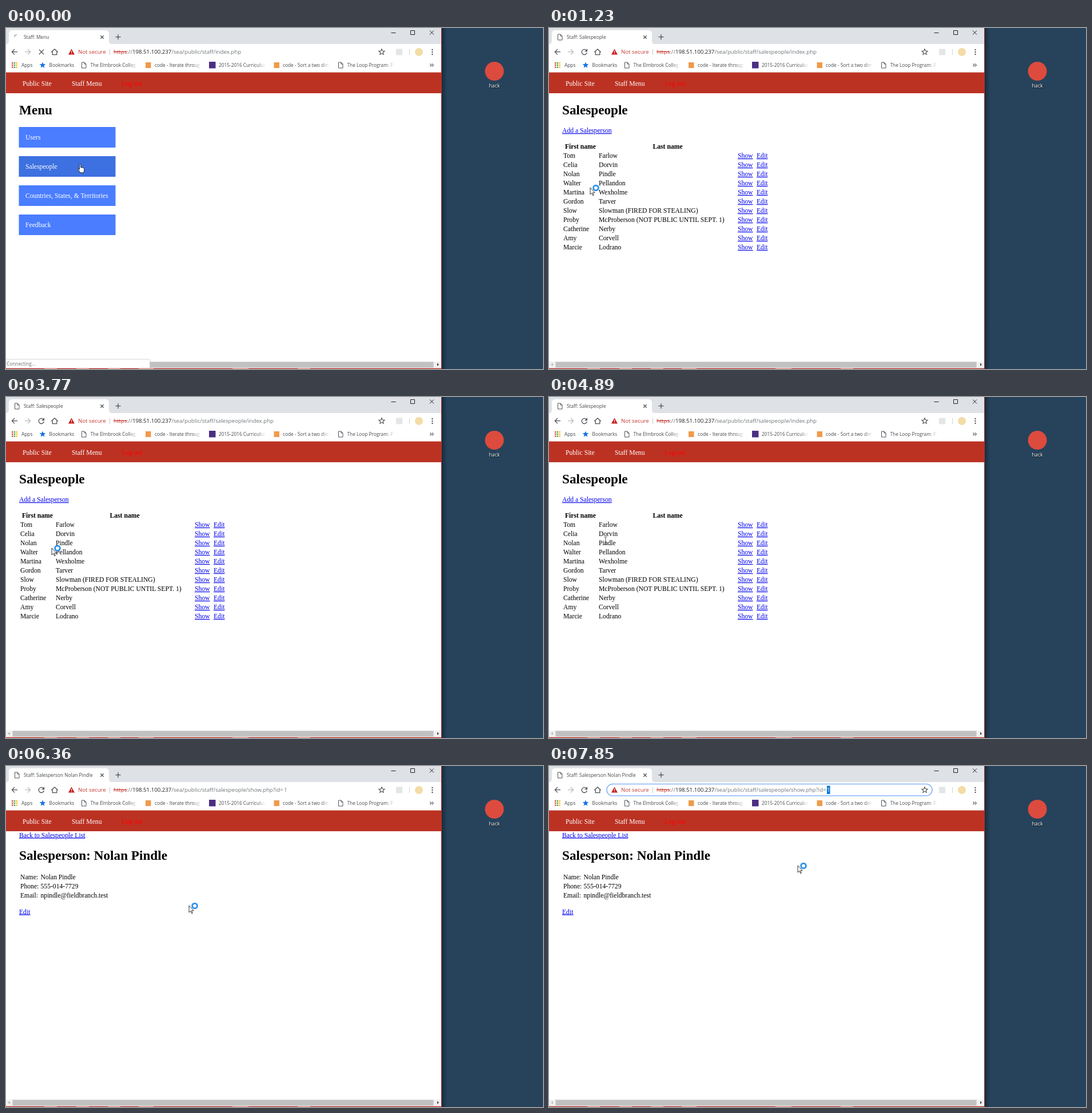
Recreate the animation shown at these times as an HTML page. Size 939 px wide and 596 px high, loop 8000 ms.

```html
<!DOCTYPE html>
<html lang="en">
<head>
<meta charset="utf-8">
<title>Staff area</title>
<style>
html, body { margin: 0; width: 100%; height: 100%; overflow: hidden; background: #fff; }
svg { display: block; width: 939px; height: 596px; }
text { white-space: pre; }
.ui { font: 8.3px "Open Sans", "Noto Sans", sans-serif; fill: #45494d; }
.url { font: 9.67px "Open Sans", "Noto Sans", sans-serif; fill: #70757a; }
.page { font: 11.65px "Liberation Serif", "Times New Roman", serif; fill: #000; }
.bold { font-weight: bold; }
.head { font-weight: bold; font-size: 23.2px; }
.link { fill: #00e; text-decoration: underline; }
.white { fill: #fff; }
.desk { font-size: 8.8px; text-shadow: 1px 1px 1px #000; }
.icon { fill: none; stroke: #4d5156; stroke-width: 1.3; }
</style>
</head>
<body>
<svg id="stage" viewBox="0 0 939 596" xmlns="http://www.w3.org/2000/svg"></svg>
<script>
const LOOP = 8000;
const person = "Nolan Pindle";

const rect = (x, y, w, h, fill, more = "") =>
  `<rect x="${x}" y="${y}" width="${w}" height="${h}" fill="${fill}" ${more}/>`;
const text = (cls, x, y, s, more = "") =>
  `<text class="${cls}" x="${x}" y="${y}" ${more}>${s}</text>`;
const page = (x, y, s, cls = "") => text("page " + cls, x, y, s);
const icon = (d, more = "") => `<path class="icon" d="${d}" ${more}/>`;
const group = (id, body) => `<g id="${id}">${body}</g>`;
const docIcon = (x, y) =>
  icon(`M${x} ${y}h4.5l3 3v7h-7.5zM${x + 4.5} ${y}v3h3`, 'style="stroke-width:1"');

function star(cx, cy, r, more) {
  let d = "";
  for (let i = 0; i < 10; i++) {
    const a = Math.PI * (i / 5 - 0.5), q = i % 2 ? r * 0.45 : r;
    d += `${i ? "L" : "M"}${(cx + q * Math.cos(a)).toFixed(2)} ${(cy + q * Math.sin(a)).toFixed(2)}`;
  }
  return `<path d="${d}Z" ${more}/>`;
}

// Bookmark label that fades out at its right end
const bookmark = (x, end, s) =>
  text("ui", x, 68, s, 'clip-path="url(#cut' + end + ')"') +
  `<clipPath id="cut${end}"><rect x="${x}" y="56" width="${end - x}" height="18"/></clipPath>` +
  rect(end - 14, 57, 15, 16, "url(#fade)");

function browser() {
  let s = rect(0, 0, 762, 596, "#fff") + rect(0, 0, 762, 28, "#dee1e6");
  s += '<path d="M0 28Q5 28 5 22V10Q5 4 11 4H174Q180 4 180 10V22Q180 28 185 28Z" fill="#fff"/>';
  s += icon("M165.3 13.3l5.4 5.4m0-5.4l-5.4 5.4M191.5 15.7h9M196 11.2v9");
  s += icon("M673.5 8.5h8M707.5 4.5h7v7h-7zM741 4.5l7 7m0-7l-7 7", 'style="stroke:#222;stroke-width:1"');
  s += icon("M20 41.7H10.5M15 37L10.4 41.7l4.6 4.7");
  s += icon("M33 41.7h9.5M38 37l4.6 4.7-4.6 4.7", 'style="stroke:#b9bcc0"');
  s += icon("M79.3 42.3L85 37l5.7 5.3M81.2 41.5v5.2h7.6v-5.2");
  s += group("reload", icon("M65.8 39.6A4.6 4.6 0 1 0 66.4 43M66.4 36.8v3.7h-3.7"));
  s += group("stop", icon("M57.8 37.6l8.4 8.4m0-8.4l-8.4 8.4"));
  s += rect(101, 31.5, 569, 21, "#f1f3f4", 'id="hover" rx="10.5"');
  s += rect(101, 31.5, 569, 20.5, "#fff", 'id="focus" rx="10.2" stroke="#8ab4f8" stroke-width="1.6"');
  s += '<path d="M114.5 36.5L120 46.5H109Z" fill="#c5221f"/>' +
    rect(114, 39.8, 1.1, 3.2, "#fff") + rect(114, 44, 1.1, 1.1, "#fff");
  s += text("url", 126, 45, "Not secure", 'style="fill:#c5392f"');
  s += rect(181, 37, 1, 10, "#c4c7ca") + rect(705, 37, 1, 10, "#d0d3d6");
  s += rect(486, 34.5, 5.5, 14.5, "#0078d7", 'id="mark"');
  s += '<text class="url" x="188" y="45"><tspan fill="#c5392f" text-decoration="line-through">https</tspan>' +
    '<tspan>://</tspan><tspan fill="#202124">198.51.100.237</tspan><tspan id="path"></tspan></text>' +
    text("", 486, 45, "1", 'id="digit" font-size="9.67" font-family="Open Sans, Noto Sans, sans-serif"');
  s += star(657, 42, 5.3, 'fill="none" stroke="#4d5156" stroke-width="1.1"');
  s += rect(682, 36.5, 11, 11, "#e4e5e7");
  s += '<circle cx="722" cy="42" r="7" fill="#f3dca6"/>';
  for (const y of [38, 42, 46]) s += `<circle cx="745.5" cy="${y}" r="1.2" fill="#4d5156"/>`;

  const dots = ["#ea4335", "#34a853", "#fbbc04", "#4285f4"];
  for (let i = 0; i < 9; i++)
    s += rect(10 + i % 3 * 3.7, 60 + Math.floor(i / 3) * 3.7, 2.4, 2.4, dots[(i + Math.floor(i / 3)) % 4]);
  s += text("ui", 27, 68, "Apps") + star(64, 65, 5.6, 'fill="#1a73e8"') + text("ui", 75.5, 68, "Bookmarks");
  s += docIcon(132.5, 60) + bookmark(147.5, 228, "The Elmbrook College");
  s += rect(244, 60, 9.5, 10, "#ee9b4c") + bookmark(260, 340, "code - Iterate through");
  s += rect(355, 59, 11.5, 11.5, "#4b2e83") + bookmark(372, 453, "2015-2016 Curriculum");
  s += rect(468.5, 60, 9.5, 10, "#ee9b4c") + bookmark(484, 565, "code - Sort a two dimen");
  s += docIcon(581.5, 60) + bookmark(596.5, 678, "The Loop Program: Pla");
  s += icon("M741.5 62.5l2.4 2.4-2.4 2.4m3.4-4.8l2.4 2.4-2.4 2.4", 'style="stroke-width:1.1"');

  s += group("doc", docIcon(15.5, 11));
  s += icon("M14.8 15.5A4.6 4.6 0 0 1 19 11.6", 'id="spin" style="stroke:#8b9096"');
  s += text("ui", 31, 19, "", 'id="title"');
  return s;
}

const nav = rect(0, 77.6, 762, 36.4, "#bb3223") +
  page(29, 101, "Public Site", "white") + page(115, 101, "Staff Menu", "white") +
  text("page", 202, 101, "Log out", 'style="fill:#f00"');

const menu = page(23, 151, "Menu", "head") +
  ["Users", "Salespeople", "Countries, States, &amp; Territories", "Feedback"].map((s, i) =>
    rect(22.5, 173 + 51 * i, 169, 36, i === 1 ? "#3d70e0" : "#4a7dff") +
    page(34, 195 + 51 * i, s, "white")).join("");

const staff = ["Tom|Farlow", "Celia|Dorvin", person.replace(" ", "|"), "Walter|Pellandon", "Martina|Wexholme",
  "Gordon|Tarver", "Slow|Slowman (FIRED FOR STEALING)", "Proby|McProberson (NOT PUBLIC UNTIL SEPT. 1)",
  "Catherine|Nerby", "Amy|Corvell", "Marcie|Lodrano"];

const list = page(23, 151, "Salespeople", "head") + page(23, 183, "Add a Salesperson", "link") +
  page(28, 211, "First name", "bold") + page(181.5, 211, "Last name", "bold") +
  staff.map((row, i) => {
    const [first, last] = row.split("|"), y = 227 + 16 * i;
    return page(25, y, first) + page(87, y, last) + page(330, y, "Show", "link") + page(363, y, "Edit", "link");
  }).join("");

const details = [["Name:", person], ["Phone:", "555-014-7729"], ["Email:", "npindle@fieldbranch.test"]];
const show = page(23, 124.5, "Back to Salespeople List", "link") +
  page(23, 164, "Salesperson: " + person, "head") +
  details.map(([k, v], i) => page(25, 198 + 16 * i, k) + page(60.5, 198 + 16 * i, v)).join("") +
  page(23, 258.5, "Edit", "link");

// Accent border along the right and bottom edges of the window
const border = rect(761, 0, 1, 596, "#a5302a") + rect(0, 594.7, 762, 1.3, "#b32b21") +
  '<path d="M67 595.5h22M123 595.5h22M178 595.5h22M232 595.5h26M396 595.5h28M510 595.5h22" stroke="#dc9a92"/>';

const footer = rect(0, 583, 761, 11.5, "#f1f1f1") + rect(11.5, 583.5, 736, 10, "#c1c1c1") +
  '<path d="M6.5 585.7v5L3.8 588.2Z" fill="#a3a3a3"/><path d="M754 585.5v5.4L757 588.2Z" fill="#404040"/>' +
  group("bubble", rect(-3, 579, 254.5, 18, "#fff", 'rx="2" stroke="#d5d5d5"') +
    text("ui", 1, 590, "", 'id="status" style="fill:#6a6e72"')) + border;

const desktop = rect(762, 0, 177, 596, "#26435b") + rect(762, 0, 9, 596, "url(#shade)") +
  '<circle cx="854" cy="75.5" r="16.5" fill="#dd4b3e"/>' +
  text("ui white desk", 854, 104.3, "hack", 'text-anchor="middle"');

const cursors =
  group("busy", '<path d="M0 0V12L2.8 9.4 4.7 13.8 6.4 13.1 4.5 8.8H8.3Z" fill="#fff" stroke="#222" stroke-width=".9"/>' +
    '<circle cx="10" cy=".4" r="4.3" fill="#fff" stroke="#2f92ea" stroke-width="2.9"/>') +
  group("hand", '<path d="M-1.3 9.5V1.2a1.2 1.2 0 0 1 2.4 0V6q1-.9 2 .1 1-.6 1.9.3 1.7-.5 2 1.1V10.5q0 2-1.2 4.4H.2Q-1.5 12-3.9 9.3-3.6 7.4-1.3 9.2Z" fill="#fff" stroke="#111" stroke-width=".9"/>') +
  group("beam", '<path d="M-2.5-6.3H-.6L0-5.7 .6-6.3H2.5M0-5.7V5.7M-2.5 6.3H-.6L0 5.7 .6 6.3H2.5" fill="none" stroke="#333" stroke-width=".9"/>');

document.getElementById("stage").innerHTML =
  `<defs><linearGradient id="fade"><stop stop-color="#fff" stop-opacity="0"/><stop offset="1" stop-color="#fff"/></linearGradient>
  <linearGradient id="shade"><stop stop-color="#182c3d"/><stop offset="1" stop-color="#26435b"/></linearGradient></defs>` +
  browser() + nav + group("menu", menu) + group("list", list) + group("show", show) + footer + desktop +
  group("cursor", cursors);

const el = id => document.getElementById(id);
const see = (id, on) => el(id).setAttribute("display", on ? "inline" : "none");
const label = (id, s) => { if (el(id).textContent !== s) el(id).textContent = s; };

// Bursts of screen updates: first, last, count
const bursts = [[150, 150, 1], [550, 1590, 9], [1730, 2680, 8], [2830, 2980, 2], [3250, 4230, 7],
  [4350, 5310, 8], [5430, 5940, 5], [6220, 7150, 8], [7300, 7450, 2], [7730, 7850, 2]];

// Pointer path: time, x, y
const path = [[0, 129.7, 238], [150, 128, 239], [550, 124, 242], [1200, 72, 279], [1590, 54, 293],
  [1730, 62, 288], [2680, 224, 221], [2980, 201, 231], [3250, 186, 237], [3740, 80, 264], [4070, 28, 286],
  [4230, 45, 294], [4350, 50, 291], [4899, 99, 251], [5036, 150, 252], [5310, 349, 258], [5430, 352, 257.5],
  [5940, 352, 257], [6220, 338, 250], [6353, 320, 244], [6750, 395, 145], [7150, 484, 52],
  [7300, 496, 44], [7450, 496, 44], [7730, 468, 105], [7850, 435, 174]];

function snap(t) {
  let s = 0;
  for (const [a, b, n] of bursts) {
    if (t < a) break;
    const step = (b - a) / (n - 1 || 1);
    s = step ? Math.min(b, a + Math.floor((t + 12 - a) / step) * step) : a;
  }
  return s;
}

function pointer(s) {
  const i = path.findIndex(p => p[0] > s);
  if (i < 0) return path[path.length - 1].slice(1);
  const [t0, x0, y0] = path[i - 1], [t1, x1, y1] = path[i];
  const k = (s - t0) / (t1 - t0);
  return [x0 + (x1 - x0) * k, y0 + (y1 - y0) * k];
}

function shape(s) {
  if (s < 150 || (s >= 5300 && s < 5940)) return "hand";
  if ((s > 4850 && s < 4950) || (s >= 7300 && s < 7730)) return "beam";
  return "busy";
}

function draw(t) {
  const s = snap(t);
  const view = t < 150 ? "menu" : t < 5940 ? "list" : "show";
  const loading = t < 150 || (t >= 5550 && t < 5940);
  const picked = t >= 7450;
  for (const v of ["menu", "list", "show"]) see(v, v === view);
  label("title", "Staff: " + { menu: "Menu", list: "Salespeople", show: "Salesperson " + person }[view]);
  label("path", "/sea/public/staff/" +
    { menu: "index.php", list: "salespeople/index.php", show: "salespeople/show.php?id=" }[view]);
  see("digit", view === "show");
  el("digit").setAttribute("fill", picked ? "#fff" : "#70757a");
  see("mark", picked);
  see("hover", t >= 7150 && t < 7300);
  see("focus", t >= 7300);
  see("stop", loading);
  see("reload", !loading);
  see("spin", loading);
  see("doc", !loading);
  el("spin").setAttribute("transform", `rotate(${t < 150 ? 0 : (5812.5 - s) * 0.5} 19 16)`);
  see("bubble", t < 550 || (t >= 5550 && t < 6220));
  label("status", t < 550 ? "Connecting..." : "Establishing secure connection...");
  const [x, y] = pointer(s);
  el("cursor").setAttribute("transform", `translate(${x.toFixed(2)} ${y.toFixed(2)})`);
  for (const c of ["busy", "hand", "beam"]) see(c, c === shape(s));
}

const start = performance.now();
function tick() {
  draw((performance.now() - start) % LOOP);
  requestAnimationFrame(tick);
}
tick();
</script>
</body>
</html>
```
